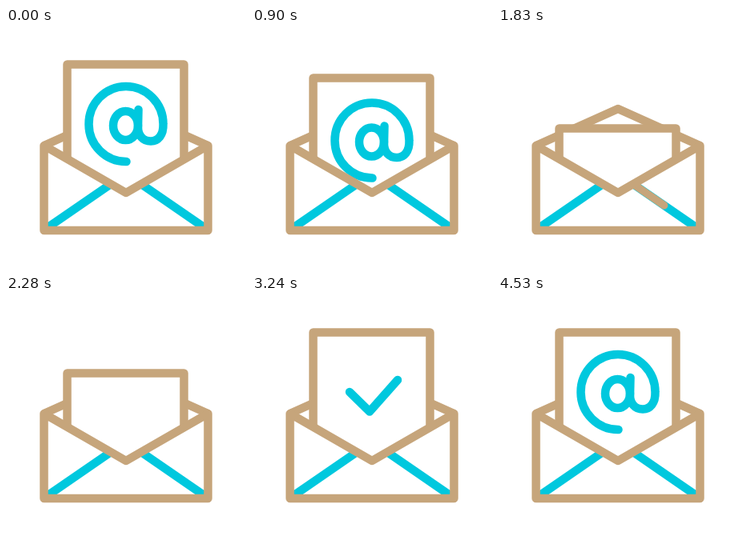
An HTML page that plays this animation: 300 by 300 pixels, repeating every 5.4 s.

```html
<!DOCTYPE html>
<html lang="en">
<head>
<meta charset="utf-8">
<title>Envelope</title>
<style>
  html, body { margin: 0; width: 100%; height: 100%; overflow: hidden; background: #fff; }
  svg { display: block; width: 100vw; height: 100vh; }
  path { fill: none; stroke-width: 10.5; stroke-linejoin: round; }
  .tan { stroke: #c6a57b; }
  .cyan { stroke: #00c8de; }
  .paper { fill: #fff; }
  .round { stroke-linecap: round; }
</style>
</head>
<body>
<svg viewBox="0 0 300 300">
  <clipPath id="pocket"><path d="M47 147L150 206L253 147V253H47Z"/></clipPath>

  <path class="tan" d="M47.5 147L150 101L252.5 147"/>
  <path id="letter" class="tan paper" d="M76.5 165V45.5H222.5V165"/>
  <path id="check" class="cyan round" pathLength="1" d="M122 120L147 144.5L182 105"/>
  <g id="at" class="cyan round">
    <path class="ink" pathLength="1" d="M150.5 167A46.5 47 0 1 1 196.500 120C197 134 190 141.500 181 141.500C171 141.500 165 134 165 124L165.500 102"/>
    <path class="ink" pathLength="1" d="M165 122A15.500 18 0 1 1 134 122A15.500 18 0 1 1 165 122"/>
  </g>

  <path class="paper" d="M47 147L150 206L253 147V253H47Z"/>
  <g clip-path="url(#pocket)">
    <path class="cyan" stroke-width="10" d="M47 253L150 182L253 253"/>
    <path id="runner" class="tan round" style="stroke-width:9.500" pathLength="1" d="M47 253L150 182L253 253"/>
  </g>
  <path class="tan" d="M47.5 147V253H252.5V147L150 206Z"/>
</svg>
<script>
const LOOP = 5400, STEP = 30;
const get = id => document.getElementById(id);
const inks = document.querySelectorAll('.ink');

// Smooth track through [time, value] points that never overshoots them.
function track(...points) {
  const last = points.length - 1;
  const rise = i => (points[i + 1][1] - points[i][1]) / (points[i + 1][0] - points[i][0]);
  const slopes = points.map((_, i) => {
    if (i === 0 || i === last) return 0;
    const a = rise(i - 1), b = rise(i);
    return a * b > 0 ? 2 * a * b / (a + b) : 0;
  });
  return t => {
    if (t <= points[0][0]) return points[0][1];
    if (t >= points[last][0]) return points[last][1];
    const i = points.findIndex(p => p[0] > t) - 1;
    const [t0, v0] = points[i], [t1, v1] = points[i + 1];
    const span = t1 - t0, u = (t - t0) / span, w = 1 - u;
    return v0 * (1 + 2 * u) * w * w + v1 * u * u * (3 - 2 * u)
      + span * u * w * (slopes[i] * w - slopes[i + 1] * u);
  };
}

const letterY = track([450, 0], [720, 5], [900, 17], [990, 28], [1140, 68], [1320, 82],
  [1680, 82], [1830, 80], [2130, 66], [2610, 10], [2700, 4], [2940, 0]);
const atY = track([450, 0], [720, 6], [900, 20.5], [990, 33], [1140, 80], [1380, 140]);
const atInk = track([3990, 0], [4020, 0.003], [4200, 0.28], [4410, 0.82], [4530, 1]);
const runHead = track([1050, 0], [1140, 0.065], [1500, 0.42], [1830, 0.78], [2130, 1]);
const runTail = track([1500, 0], [1560, 0.03], [1830, 0.5], [2340, 1]);
const checkHead = track([2400, 0], [2610, 0.62], [2940, 1]);
const checkTail = track([3300, 0], [3570, 0.5], [3840, 1]);

// Shows only the part of a path between two fractions of its length.
function trim(path, from, to) {
  path.style.visibility = to > from ? 'visible' : 'hidden';
  path.style.strokeDasharray = `${Math.max(to - from, 0)} 2`;
  path.style.strokeDashoffset = -from;
}

function draw(t) {
  const leaving = t < 1400;
  get('letter').setAttribute('transform', `translate(0 ${letterY(t)})`);
  get('at').setAttribute('transform', `translate(0 ${leaving ? atY(t) : 0})`);
  inks.forEach(path => trim(path, 0, leaving ? 1.01 : atInk(t) * 1.01));
  trim(get('check'), checkTail(t), checkHead(t));
  trim(get('runner'), runTail(t), runHead(t));
}

const start = performance.now();
function tick() {
  const t = (performance.now() - start) % LOOP;
  draw(Math.floor(t / STEP) * STEP);
  requestAnimationFrame(tick);
}
tick();
</script>
</body>
</html>
```
